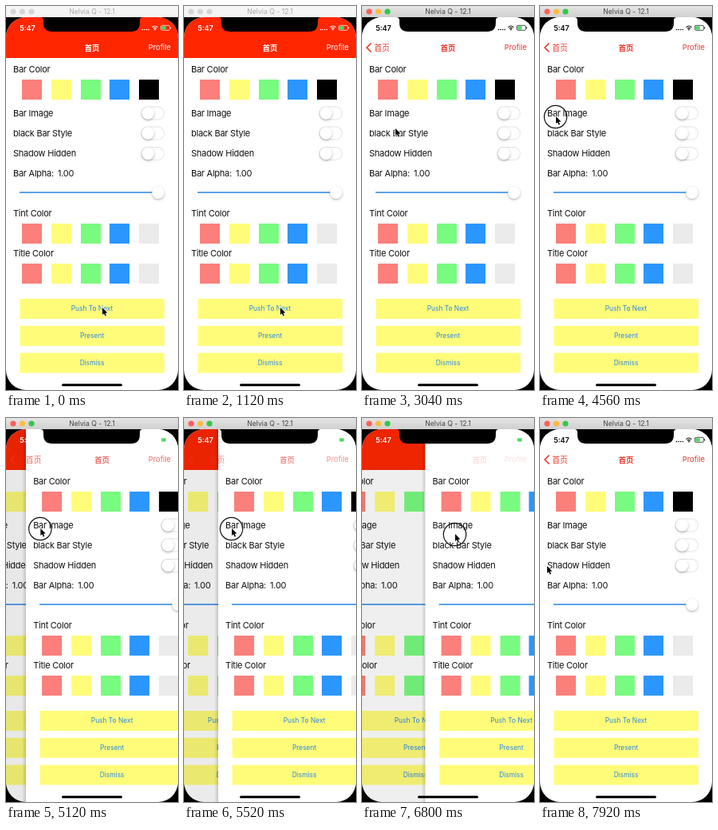
These frames come from a looping animation (216x480 px, 8000 ms). An HTML page with a canvas:

```html
<!DOCTYPE html>
<html lang="zh-CN">
<head>
<meta charset="utf-8">
<style>
html, body { margin: 0; width: 100%; height: 100%; overflow: hidden; background: #000; }
canvas { display: block; width: 216px; height: 480px; }
</style>
</head>
<body>
<canvas id="stage"></canvas>
<script>
const W = 216, H = 480, LOOP = 8000;
const PUSH = 1960, DRAG = 4600, RELEASE = 6690, CANCEL = 380;
const RED = '#ff2600', TINT = '#e8352b', BLUE = '#2a86e6';
const SWATCHES = ['#fb7f7a', '#fffc79', '#78fb80', '#2c96ff'];
const FONT = 'Inter, "Noto Sans CJK SC", "Noto Sans CJK", sans-serif';

const canvas = document.getElementById('stage');
const g = canvas.getContext('2d');
const dpr = window.devicePixelRatio || 1;
canvas.width = W * dpr;
canvas.height = H * dpr;

const clamp = v => Math.max(0, Math.min(1, v));
const ease = u => (1 - Math.cos(Math.PI * u)) / 2;

// time, x, y, eased arrival
const path = [
  [0, 121, 377], [2440, 121, 377], [3040, 42, 153, 1], [3800, 20, 138, 1], [4560, 20, 138],
  [5520, 60, 138], [6800, 117, 145], [7000, 119, 148], [7640, 9, 185, 1], [LOOP, 9, 185]
];

function cursorAt(t) {
  const i = path.findIndex(p => p[0] > t);
  const [t0, x0, y0] = path[i - 1], [t1, x1, y1, soft] = path[i];
  let u = (t - t0) / (t1 - t0);
  if (soft) u = ease(u);
  return [x0 + (x1 - x0) * u, y0 + (y1 - y0) * u];
}

// Left edge of the upper page
function offsetAt(t) {
  if (t < PUSH) return W;
  if (t < DRAG) {
    const s = (t - PUSH) * 0.012;
    const x = W * (1 + s) * Math.exp(-s);
    return x < 0.4 ? 0 : x;
  }
  const dragged = (cursorAt(Math.min(t, RELEASE))[0] - 20) * 1.075;
  return dragged * (1 - ease(clamp((t - RELEASE) / CANCEL)));
}

function rect(x, y, w, h, color) {
  g.fillStyle = color;
  g.fillRect(x, y, w, h);
}

function round(x, y, w, h, r, color) {
  g.beginPath();
  g.roundRect(x, y, w, h, r);
  g.fillStyle = color;
  g.fill();
}

function disc(x, y, r, color) {
  g.beginPath();
  g.arc(x, y, r, 0, 7);
  g.fillStyle = color;
  g.fill();
}

function line(points, color, width) {
  g.beginPath();
  points.forEach(([x, y]) => g.lineTo(x, y));
  g.strokeStyle = color;
  g.lineWidth = width;
  g.stroke();
}

function text(s, x, y, size, color, align = 'left', weight = 400, spacing = 0) {
  g.font = `${weight} ${size}px ${FONT}`;
  g.letterSpacing = spacing + 'px';
  g.textAlign = align;
  g.fillStyle = color;
  g.fillText(s, x, y);
}

function knob(x, y) {
  g.save();
  g.shadowColor = 'rgba(0,0,0,.3)';
  g.shadowBlur = 3 * dpr;
  g.shadowOffsetY = 1.2 * dpr;
  disc(x, y, 7.7, '#fff');
  g.restore();
}

function toggle(y) {
  round(169.5, y - 8.5, 29.5, 17, 8.5, '#e3e3e3');
  round(170.4, y - 7.6, 27.7, 15.2, 7.6, '#fff');
  knob(178.3, y);
}

function swatches(y, last) {
  [...SWATCHES, last].forEach((c, i) => rect(20 + Math.round(i * 36.75), y, 25, 25, c));
}

function page(x, barColor, pressed) {
  g.save();
  g.translate(x, 0);
  rect(0, 14, W, H, '#fff');
  rect(0, 14, W, 51, barColor);

  const label = (s, y, lx = 9) => text(s, lx, y, 11, '#111', 'left', 400, -0.25);
  label('Bar Color', 82.5);
  label('Bar Image', 137.5);
  label('black Bar Style', 162.5);
  label('Shadow Hidden', 188);
  label('Bar Alpha:', 212.5);
  label('1.00', 212.5, 65);
  label('Tint Color', 262.5);
  label('Title Color', 313);

  swatches(92, '#000');
  swatches(272, '#ebebeb');
  swatches(322, '#ebebeb');
  [134, 159, 184.5].forEach(toggle);

  rect(17, 232.3, 170, 1.5, BLUE);
  knob(191, 233.3);

  ['Push To Next', 'Present', 'Dismiss'].forEach((s, i) => {
    const y = 366 + i * 33.8;
    rect(17.5, y, 181.5, 25, '#fffc79');
    g.globalAlpha = pressed && !i ? 0.2 : 1;
    text(s, 108, y + 15.3, 8.4, BLUE, 'center');
    g.globalAlpha = 1;
  });
  g.restore();
}

function navItems(q) {
  g.globalAlpha = clamp(2 * q - 1);
  text('首页', 108 - 83 * (1 - q), 55.7, 9.3, '#fff', 'center', 700);
  text('Profile', 207, 55.3, 9.3, '#fff', 'right');

  g.globalAlpha = clamp(1 - 2.3 * q);
  line([[11.5, 46.5], [6, 52], [11.5, 57.5]], TINT, 1.6);
  text('首页', 25 + 83 * q, 55.7, 9.8, TINT, 'center');
  text('首页', 108 + 108 * q, 55.7, 9.3, TINT, 'center', 700);
  text('Profile', 207, 55.3, 9.3, TINT, 'right');
  g.globalAlpha = 1;
}

function statusBar(color) {
  text('5:47', 27, 30.5, 9, color, 'center', 600);
  for (let i = 0; i < 4; i++) disc(171.5 + i * 2.6, 29.5, 0.8, color);
  g.strokeStyle = color;
  g.lineWidth = 1.2;
  [2.5, 4.8].forEach(r => {
    g.beginPath();
    g.arc(187, 30, r, -2.35, -0.8);
    g.stroke();
  });
  disc(187, 29.6, 0.9, color);
  g.lineWidth = 0.7;
  g.beginPath();
  g.roundRect(194.3, 24.3, 11.4, 6, 1.7);
  g.stroke();
  rect(206.3, 26.2, 0.9, 2.2, color);
  round(195.2, 25.2, 5.6, 4.2, 0.8, '#4cd964');
}

function windowBar(active) {
  const fill = g.createLinearGradient(0, 0, 0, 14);
  fill.addColorStop(0, active ? '#e4e4e4' : '#f6f6f6');
  fill.addColorStop(1, active ? '#d0d0d0' : '#f4f4f4');
  rect(0, 0, W, 14, fill);
  const lights = active ? ['#fc605b', '#fdbc40', '#34c84a'] : Array(3).fill('#d6d6d6');
  lights.forEach((c, i) => disc(9 + i * 11.5, 7, 3.6, c));
  text('Nelvia Q - 12.1', 108, 10.2, 8.7, active ? '#444' : '#aaa', 'center');
}

function notch() {
  g.beginPath();
  g.moveTo(43, 13);
  g.lineTo(43, 14);
  g.quadraticCurveTo(47, 14, 47, 18);
  g.lineTo(47, 21);
  g.quadraticCurveTo(47, 32, 58, 32);
  g.lineTo(157, 32);
  g.quadraticCurveTo(168, 32, 168, 21);
  g.lineTo(168, 18);
  g.quadraticCurveTo(168, 14, 172, 14);
  g.lineTo(172, 13);
  g.fillStyle = '#000';
  g.fill();
}

function pointer(x, y, touching) {
  if (touching) {
    g.beginPath();
    g.arc(x - 0.5, y + 0.5, 14.2, 0, 7);
    g.strokeStyle = '#111';
    g.lineWidth = 1.2;
    g.stroke();
  }
  g.save();
  g.translate(x, y);
  g.beginPath();
  [[0, 0], [0, 9], [2, 7.2], [3.5, 10.6], [5, 9.9], [3.6, 6.7], [6.4, 6.5]]
    .forEach(([px, py]) => g.lineTo(px, py));
  g.closePath();
  g.strokeStyle = '#fff';
  g.lineWidth = 1.4;
  g.stroke();
  g.fillStyle = '#000';
  g.fill();
  g.restore();
}

function draw(t) {
  const x = offsetAt(t), q = x / W;
  g.setTransform(dpr, 0, 0, dpr, 0, 0);
  rect(0, 0, W, H, '#000');

  g.save();
  g.beginPath();
  g.roundRect(0, 14, W, H - 14, 25);
  g.clip();
  if (x > 0) {
    page(-0.3 * (W - x), RED, t > 1880 && t < 2060);
    rect(0, 14, x, H, `rgba(0,0,0,${0.1 * (1 - q)})`);
    if (x < W) {
      const shade = g.createLinearGradient(x - 5, 0, x, 0);
      shade.addColorStop(0, 'rgba(0,0,0,0)');
      shade.addColorStop(1, 'rgba(0,0,0,.16)');
      rect(x - 5, 14, 5, H, shade);
    }
  }
  if (x < W) page(x, '#fff', false);
  navItems(q);

  const light = t < PUSH || (t > DRAG && t < RELEASE + CANCEL);
  g.globalAlpha = light ? 1 : clamp(0.4 + Math.abs(t - PUSH) / 200);
  statusBar(light ? '#fff' : '#000');
  g.globalAlpha = 1;
  round(70, 472.3, 76, 3, 1.5, '#000');
  g.restore();

  notch();
  windowBar(t > 1880);
  pointer(...cursorAt(t), t > 4480 && t < 6860);
}

const start = performance.now();
function tick() {
  draw((performance.now() - start) % LOOP);
  requestAnimationFrame(tick);
}
tick();
</script>
</body>
</html>
```
